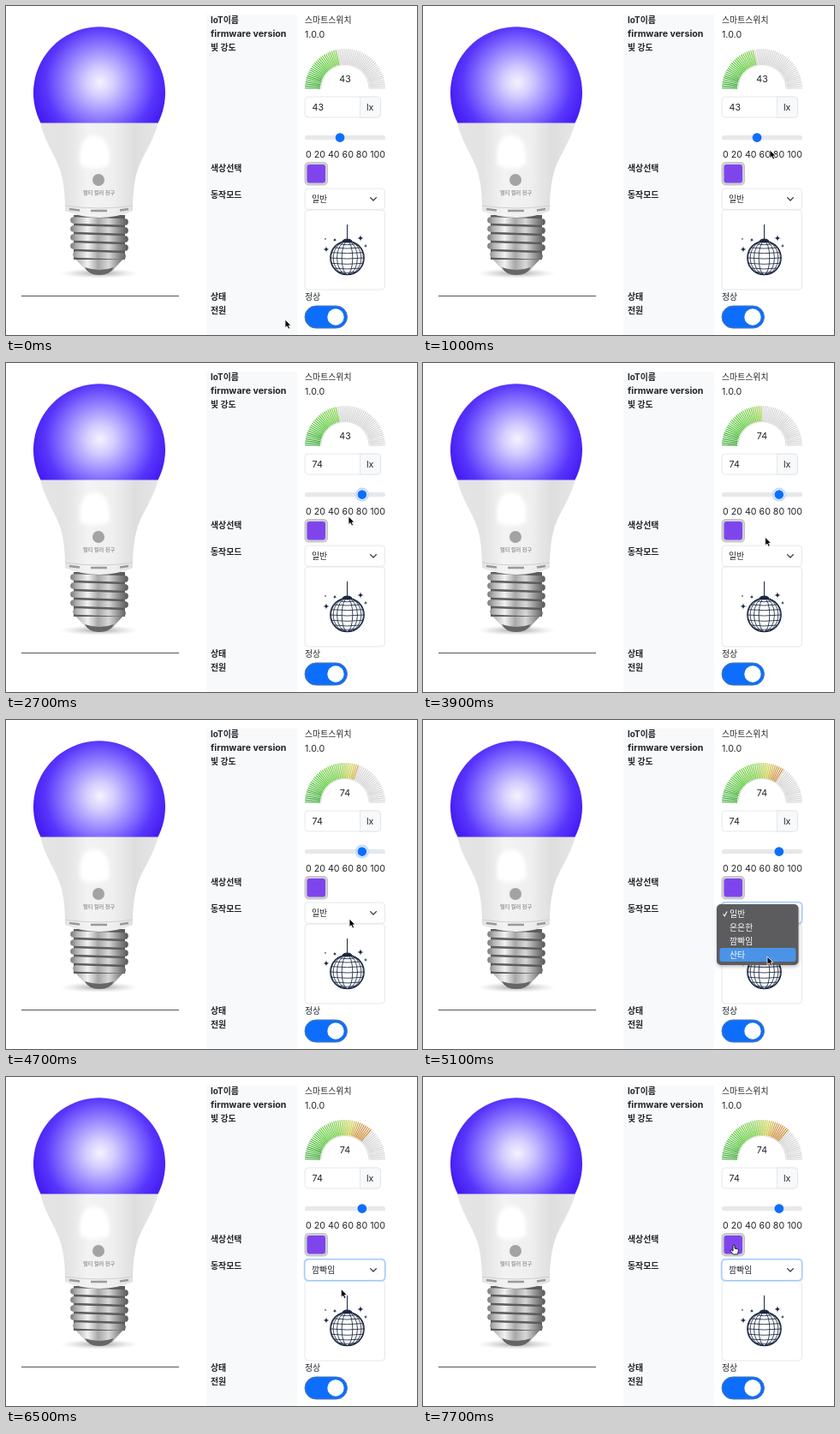
An HTML page that plays this animation: 480x384 px, repeating every 8 s.

```html
<!DOCTYPE html>
<html lang="ko">
<head>
<meta charset="utf-8">
<title>Smart bulb panel</title>
<style>
html, body { margin: 0; width: 100%; height: 100%; overflow: hidden; background: #fff; }
svg { display: block; width: 480px; height: 384px; }
text { font: 10.67px Inter, "Noto Sans CJK KR", "Noto Sans CJK", sans-serif; fill: #212529; white-space: pre; }
.ko { font-size: 9.9px; }
.b { font-weight: 700; }
.frame { fill: #fff; stroke: #dee2e6; stroke-width: .8; }
</style>
</head>
<body>
<svg viewBox="0 0 480 384">
  <defs>
    <radialGradient id="glow" gradientUnits="userSpaceOnUse" cx="110" cy="89" r="80">
      <stop offset="0" stop-color="#f5f2ff"/><stop offset=".2" stop-color="#d5ceff"/>
      <stop offset=".5" stop-color="#9583ff"/><stop offset=".8" stop-color="#5836fb"/>
      <stop offset="1" stop-color="#461df3"/>
    </radialGradient>
    <linearGradient id="shell" gradientUnits="userSpaceOnUse" x1="40" x2="178" y1="0" y2="0">
      <stop offset="0" stop-color="#e4e4e4"/><stop offset=".22" stop-color="#e3e3e3"/>
      <stop offset=".4" stop-color="#f3f3f3"/><stop offset=".62" stop-color="#efefef"/>
      <stop offset=".8" stop-color="#dedede"/><stop offset="1" stop-color="#e6e6e6"/>
    </linearGradient>
    <linearGradient id="metal" gradientUnits="userSpaceOnUse" x1="75" x2="143" y1="0" y2="0">
      <stop offset="0" stop-color="#777"/><stop offset=".12" stop-color="#b5b5b5"/>
      <stop offset=".3" stop-color="#f2f2f2"/><stop offset=".48" stop-color="#a8a8a8"/>
      <stop offset=".66" stop-color="#d8d8d8"/><stop offset=".86" stop-color="#858585"/>
      <stop offset="1" stop-color="#555"/>
    </linearGradient>
    <radialGradient id="shade">
      <stop offset="0" stop-color="#777" stop-opacity=".7"/><stop offset="1" stop-color="#bbb" stop-opacity="0"/>
    </radialGradient>
    <filter id="soft" x="-30%" y="-30%" width="160%" height="160%"><feGaussianBlur stdDeviation="2"/></filter>
    <clipPath id="globe"><circle cx="398.5" cy="294" r="19.5"/></clipPath>
  </defs>

  <!-- bulb -->
  <ellipse cx="109" cy="312" rx="46" ry="6" fill="url(#shade)"/>
  <path d="M80 294H138L127 306Q124 313 109 314Q94 313 91 306Z" fill="url(#metal)"/>
  <path d="M92 305Q109 311 126 305Q122 314 109 314Q96 314 92 305Z" fill="#666"/>
  <rect x="79" y="244" width="60" height="52" fill="#5c5c5c"/>
  <g id="threads" stroke="url(#metal)" stroke-width="7.6" stroke-linecap="round"/>
  <path d="M40 136H178C171 161 159 174 153 194C149 208 148 222 148 239Q130 247 109 247Q88 247 69 239C69 222 68 208 64 194C58 174 46 161 40 136Z" fill="url(#shell)"/>
  <path d="M87 186C84 165 90 151 103 151C117 151 123 166 120 186Q104 193 87 186Z" fill="#fff" filter="url(#soft)"/>
  <path d="M69 233Q109 239 148 233" fill="none" stroke="#d0d0d0"/>
  <path d="M74 237L86 238.5M99 239H118M133 238.5L143 237" stroke="#999" stroke-width="2.4"/>
  <path d="M40.5 136.5A77 77 0 1 1 177.5 136.5Z" fill="url(#glow)"/>
  <circle cx="108" cy="203" r="7" fill="#a3a3a3"/>
  <text class="b" x="90" y="220" style="font-size:6.2px;fill:#999">멀티 컬러 전구</text>
  <path d="M18 338.5H202" stroke="#555"/>

  <!-- panel -->
  <rect x="234" y="10" width="106" height="374" fill="#f8f9fa"/>
  <g id="labels"></g>
  <text class="ko" x="349" y="20">스마트스위치</text>
  <text x="349" y="36.5">1.0.0</text>
  <g id="gauge"></g>
  <path d="M368 96.5A28 28 0 0 1 424 96.5" fill="none" stroke="#ccc" stroke-width=".7"/>
  <text id="reading" x="396" y="89" text-anchor="middle"></text>

  <rect class="frame" x="349" y="106" width="88.5" height="24" rx="4"/>
  <path d="M413.5 106H433.5A4 4 0 0 1 437.5 110V126A4 4 0 0 1 433.5 130H413.5Z" class="frame" style="fill:#f8f9fa"/>
  <text id="amount" x="357.5" y="122"></text>
  <text x="421" y="122">lx</text>
  <rect x="349" y="151" width="94" height="5.3" rx="2.65" fill="#e6e8ea"/>
  <g id="thumb">
    <g id="halo"><circle r="8" fill="#c2dbfe"/><circle r="6" fill="#fff"/></g>
    <circle id="knob" r="5.33"/>
  </g>
  <text x="350" y="177">0 20 40 60 80 100</text>

  <rect x="349" y="182.5" width="26.5" height="26.5" rx="4.5" fill="#d0d0d2" stroke="#b9b9bb" stroke-width=".8"/>
  <rect x="351.5" y="185" width="21.5" height="21.5" rx="3" fill="#7f45ec"/>

  <rect class="frame" x="349" y="238" width="93.5" height="93" rx="4"/>
  <rect id="focus" x="347.7" y="211.7" width="96" height="27" rx="5" fill="#c2dbfe"/>
  <rect id="select" class="frame" x="349" y="213" width="93.5" height="24.4" rx="4"/>
  <text id="mode" class="ko" x="357" y="228.5"></text>
  <path d="M425.6 223.6L429 227L432.4 223.6" fill="none" stroke="#343a40" stroke-width="1.3" stroke-linecap="round" stroke-linejoin="round"/>

  <!-- mirror ball -->
  <g fill="none" stroke="#1b2740">
    <path d="M398.5 255V272"/>
    <path d="M393 275.5Q393 272 398.5 272T404 275.5Z" fill="#1b2740"/>
    <g id="mesh" clip-path="url(#globe)" stroke-width=".85"></g>
    <circle cx="398.5" cy="294" r="19.7" stroke-width="1.3"/>
  </g>
  <g id="stars" fill="#1b2740"></g>

  <text class="ko" x="349" y="342.5">정상</text>
  <rect x="349" y="350" width="49.5" height="26" rx="13" fill="#0d6efd" stroke="#577ba8"/>
  <circle cx="385" cy="363" r="9.7" fill="#fff"/>

  <g id="menu">
    <rect x="343" y="217" width="96" height="71" rx="5" fill="#000" opacity=".25" filter="url(#soft)"/>
    <rect x="343" y="215" width="95.5" height="71" rx="5" fill="#5c5c5f"/>
    <rect id="hover" x="346.5" width="89" height="16" rx="3" fill="#4a93e6"/>
    <path d="M350.5 226.5L352.2 229L355 223.5" fill="none" stroke="#fff" stroke-width="1.1"/>
    <g id="items"></g>
  </g>

  <path id="arrow" d="M0 0V9.6L2.2 7.6L3.8 11L5.6 10.2L4.1 6.9H7Z" stroke="#fff" stroke-width=".8"/>
  <path id="hand" d="M-1 -2.5Q0 -3.6 1 -2.5V1L4.6 2Q5.6 2.4 5.4 3.6L4.4 8H-.6L-4 4.2Q-4 2.6 -2.6 3L-1 4.3Z" fill="#fff" stroke="#111" stroke-width=".9" stroke-linejoin="round"/>
</svg>

<script>
const LOOP = 8000, BARS = 60, ROW = 16;
const $ = id => document.getElementById(id);
const MODES = ['일반', '은은한', '깜빡임', '산타'];

// rows of [time, values...], eased between rows
const MOVES = [
  [100, 326, 366], [1000, 405, 168], [1300, 390, 154], [1700, 409, 155], [2000, 409, 155],
  [2400, 415, 155], [2500, 415, 155], [2700, 400, 179], [3200, 399, 190], [3600, 399, 190],
  [4400, 401, 232], [4800, 401, 232], [5050, 402, 276], [5150, 402, 276], [5500, 398, 259],
  [6250, 398, 259], [7150, 363, 199]
];
const DRAG = [[1300, 43], [1700, 66], [2000, 66], [2400, 74]];

const clamp = x => Math.max(0, Math.min(1, x));
const show = (id, on) => $(id).setAttribute('visibility', on ? 'visible' : 'hidden');
const place = (id, x, y) => $(id).setAttribute('transform', `translate(${x} ${y})`);
const range = (n, f) => Array.from({ length: n }, (_, i) => f(i)).join('');

function track(keys, t) {
  const i = keys.findIndex(k => k[0] > t);
  if (i === 0) return keys[0].slice(1);
  if (i < 0) return keys[keys.length - 1].slice(1);
  const a = keys[i - 1], b = keys[i];
  const u = (t - a[0]) / (b[0] - a[0]), e = u * u * (3 - 2 * u);
  return a.slice(1).map((v, j) => v + (b[j + 1] - v) * e);
}

function barColor(p) {
  const hue = p < .43 ? 118 - p * 50 : Math.max(34, 96 - (p - .43) * 300);
  return `hsl(${hue} 58% ${40 + 14 * Math.sin(p * Math.PI)}%)`;
}

function build() {
  $('labels').innerHTML = [
    ['IoT이름', 20], ['firmware version', 36], ['빛 강도', 52], ['색상선택', 192.5],
    ['동작모드', 224], ['상태', 342.5], ['전원', 358.5]
  ].map(([s, y]) => `<text class="b${y === 36 ? '' : ' ko'}" x="239" y="${y}">${s}</text>`).join('');

  $('threads').innerHTML = range(5, i => {
    const y = 251 + i * 10, inset = i === 4 ? 3 : 0;
    return `<path d="M${79 + inset} ${y - 1}L${139 - inset} ${y + 1}"/>`;
  });

  $('gauge').innerHTML = range(BARS, i => {
    const a = Math.PI * (i + .5) / BARS, c = Math.cos(a), s = Math.sin(a);
    return `<path d="M${396 - 29 * c} ${97 - 29 * s}L${396 - 47 * c} ${97 - 47 * s}" stroke-width="1.2"/>`;
  });

  $('mesh').innerHTML =
    range(9, i => {
      const a = (i - 4) * .33, y = 294 + 19.5 * Math.sin(a), w = 19.5 * Math.cos(a);
      return `<path d="M${398.5 - w} ${y}Q398.5 ${y + 2} ${398.5 + w} ${y}"/>`;
    }) +
    range(5, i => `<ellipse cx="398.5" cy="294" rx="${19.5 * Math.sin(i * .33)}" ry="19.5"/>`);

  $('stars').innerHTML = [[374, 284, 4], [384, 273, 2.8], [373, 272, 1.4], [414, 271, 4.2], [420, 280, 2.2], [411, 279, 1.6]]
    .map(([x, y, r]) => `<path d="M${x} ${y - r}Q${x} ${y} ${x + r} ${y}Q${x} ${y} ${x} ${y + r}Q${x} ${y} ${x - r} ${y}Q${x} ${y} ${x} ${y - r}"/>`).join('');

  $('items').innerHTML = MODES.map((s, i) =>
    `<text class="ko" x="358" y="${229.7 + i * ROW}" style="fill:#fff">${s}</text>`).join('');
}

function draw(t) {
  const [x, y] = track(MOVES, t);
  const value = track(DRAG, t)[0];
  const dragging = t >= 1300 && t < 2450;

  place('arrow', x, y);
  place('hand', x, y);
  const overSwatch = t > 6500 && y < 209;
  show('arrow', !overSwatch);
  show('hand', overSwatch);

  place('thumb', 354.3 + value * .832, 153.6);
  show('halo', t >= 1300 && t < 4800);
  $('knob').setAttribute('fill', dragging ? '#b6d4fe' : '#0d6efd');
  $('amount').textContent = Math.round(value);

  const level = (43 + 31 * clamp((t - 3500) / 2000)) / 100;
  [...$('gauge').children].forEach((bar, i) => {
    const p = (i + .5) / BARS;
    bar.setAttribute('stroke', p < level ? barColor(p) : '#d3d3d3');
  });
  $('reading').textContent = t < 3550 ? 43 : 74;

  const open = t >= 4800;
  show('focus', open);
  $('select').style.stroke = open ? '#86b7fe' : '#dee2e6';
  $('mode').textContent = MODES[t < 6050 ? 0 : 2];
  const fade = 1 - clamp((t - 5860) / 210);
  show('menu', open && fade > 0);
  $('menu').setAttribute('opacity', fade);
  const row = Math.max(0, Math.min(3, Math.floor((y - 218) / ROW)));
  $('hover').setAttribute('y', 218 + row * ROW);
}

function tick(now) {
  draw(now % LOOP);
  requestAnimationFrame(tick);
}

build();
draw(0);
requestAnimationFrame(tick);
</script>
</body>
</html>
```
